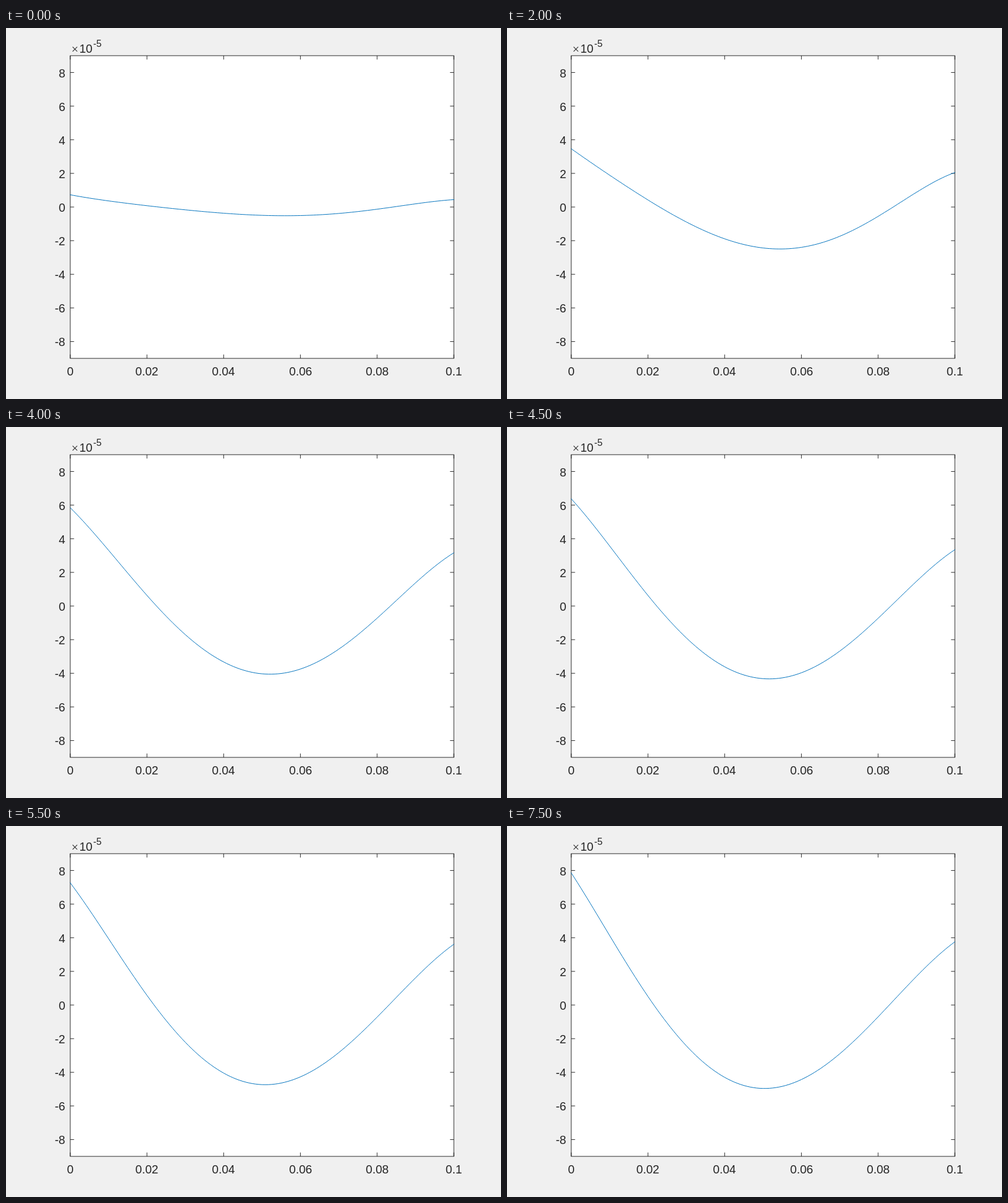
Recreate the animation shown at these times as an HTML page. Size 840 by 630 pixels, loop 8000 ms.

```html
<!DOCTYPE html>
<html lang="en">
<head>
<meta charset="utf-8">
<title>Deflection plot</title>
<style>
  html, body { margin: 0; width: 100%; height: 100%; overflow: hidden; background: #f0f0f0; }
  svg { display: block; width: 840px; height: 630px; }
  text { font: 20px "Liberation Sans", Arial, sans-serif; fill: #262626; }
  .exp { font-size: 16px; }
  .times { font: 21px "Liberation Serif", "Times New Roman", serif; }
  #frame { fill: #fff; stroke: #262626; }
  #ticks { stroke: #262626; fill: none; }
  #curve { stroke: #0072bd; fill: none; stroke-linecap: square; stroke-linejoin: round; }
</style>
</head>
<body>
<svg viewBox="0 0 840 630">
  <rect id="frame" x="109" y="47" width="651" height="514"/>
  <path id="ticks"/>
  <g id="labels">
    <text class="times" x="111" y="43">×</text>
    <text x="124.5" y="42">10</text>
    <text class="exp" x="148" y="32">-5</text>
  </g>
  <path id="curve"/>
</svg>
<script>
const LEFT = 109, RIGHT = 760, TOP = 47, BOTTOM = 561, ZERO = 304;
const STEP_MS = 500, STEPS = 16, TICK = 6.5, SEGMENTS = 120;
const HALF_SWING = 30.4; // steps from rest through the peak and back

// Strengths of the 1st, 3rd and 5th harmonic at six even stations, in pixels.
const harmonics = [
  [-214.8, 8.4, -2.4],
  [-19.2, -3.3, 1.5],
  [119.5, -4.6, -0.8],
  [131.2, 3.9, -0.5],
  [24, 4, 0],
  [-111.2, -3.6, 0]
];

function stationValues(step) {
  const phase = Math.PI * (step + 1) / HALF_SWING;
  return harmonics.map(h => h.reduce((sum, a, i) => sum + a * Math.sin((2 * i + 1) * phase), 0));
}

// Polynomial through values at 0, 1, 2, ...
function interpolate(values, x) {
  return values.reduce((sum, v, i) =>
    sum + values.reduce((w, _, j) => j === i ? w : w * (x - j) / (i - j), v), 0);
}

function curvePath(step) {
  const values = stationValues(step);
  const points = Array.from({ length: SEGMENTS + 1 }, (_, i) => {
    const s = i / SEGMENTS;
    const x = LEFT + s * (RIGHT - LEFT);
    const y = ZERO + interpolate(values, s * (values.length - 1));
    return x.toFixed(2) + " " + y.toFixed(2);
  });
  return "M" + points.join("L");
}

function addLabel(value, x, y, anchor) {
  const t = document.createElementNS("http://www.w3.org/2000/svg", "text");
  t.setAttribute("x", x);
  t.setAttribute("y", y);
  t.setAttribute("text-anchor", anchor);
  t.textContent = value;
  document.getElementById("labels").append(t);
}

let ticks = "";
for (let i = 0; i <= 5; i++) {
  const x = LEFT + i * (RIGHT - LEFT) / 5;
  ticks += `M${x} ${TOP}v${TICK}M${x} ${BOTTOM}v${-TICK}`;
  addLabel(+(i * 0.02).toFixed(2), Math.round(x), 590, "middle");
}
for (let v = -8; v <= 8; v += 2) {
  const y = ZERO - v * (BOTTOM - TOP) / 18;
  ticks += `M${LEFT} ${y}h${TICK}M${RIGHT} ${y}h${-TICK}`;
  addLabel(v, 100.5, Math.round(y) + 8, "end");
}
document.getElementById("ticks").setAttribute("d", ticks);

const curve = document.getElementById("curve");
const start = performance.now();
let shown = -1;

function draw(now) {
  const step = Math.floor(Math.max(0, now - start) / STEP_MS) % STEPS;
  if (step !== shown) curve.setAttribute("d", curvePath(shown = step));
  requestAnimationFrame(draw);
}
draw(start);
</script>
</body>
</html>
```
